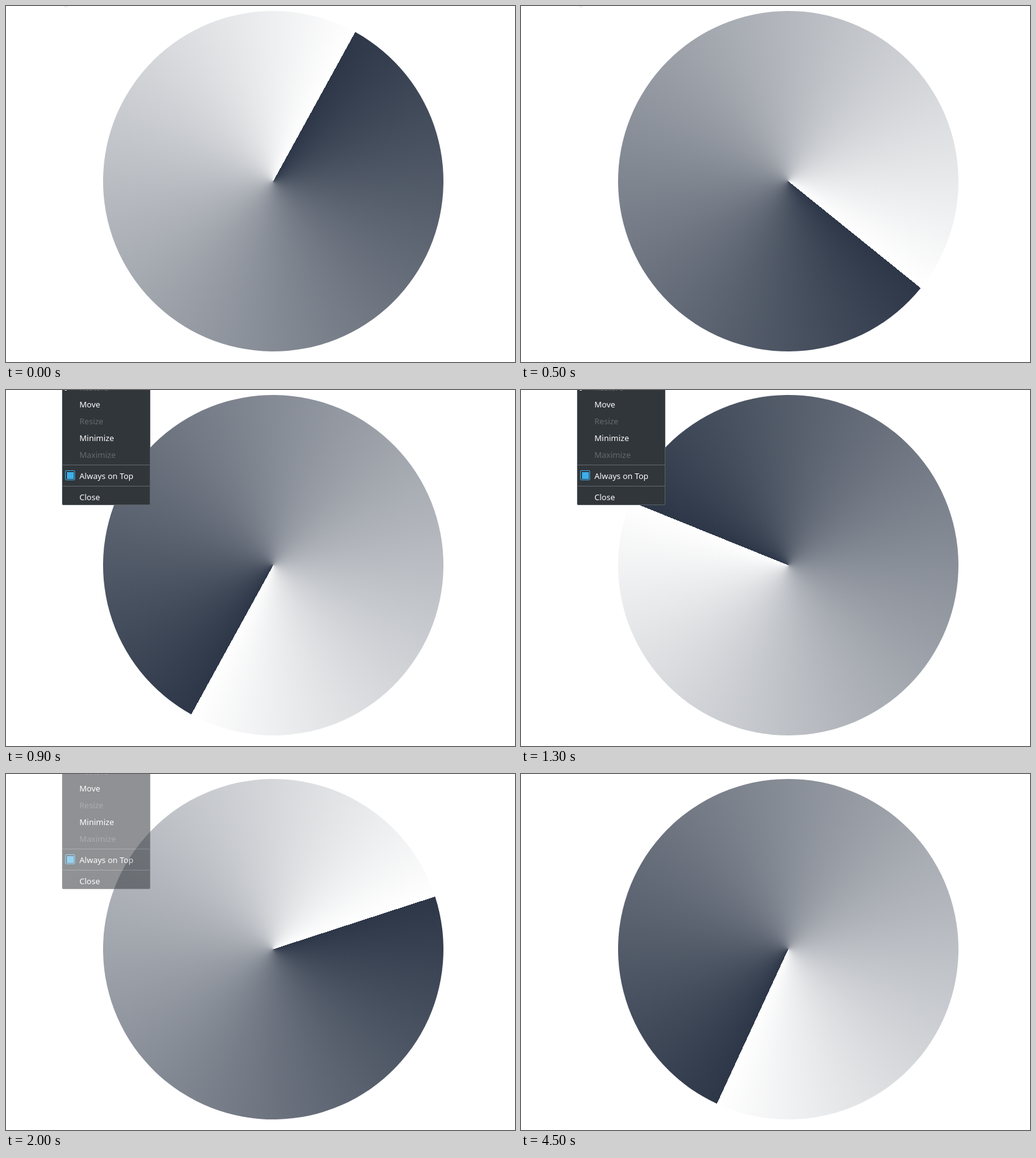
An HTML page that plays this animation: 818 by 572 pixels, repeating every 4600 ms.

```html
<!DOCTYPE html>
<html lang="en">
<head>
<meta charset="utf-8">
<title>Rotating conic gradient</title>
<style>
html, body { margin: 0; width: 100%; height: 100%; overflow: hidden; background: #fff; }
body, #menu { position: relative; }
div { position: absolute; box-sizing: border-box; }
#disc {
  left: 156px; top: 8px; width: 547px; height: 547px;
  border-radius: 50%;
  background: conic-gradient(#2d3748, #fff);
}
#menu {
  position: absolute;
  left: 90px; top: -30px; width: 142px; height: 215px;
  background: #31363b; border: 1px solid #5b6064; border-radius: 2px;
  font: 13px/26px "Noto Sans", sans-serif;
  color: #fcfcfc; white-space: nowrap;
}
.item { left: 27px; }
.off { color: #656a6e; }
.rule { left: 0; width: 140px; height: 1px; background: #63676b; }
#box {
  left: 4px; top: 158px; width: 16px; height: 16px;
  border: 1px solid #3daee9; border-radius: 2px;
  background: #3daee9 content-box; padding: 1.5px;
}
#pointer {
  left: 95px; top: -2px; width: 3px; height: 3px;
  background: #fff; transform: skewX(-25deg);
  box-shadow: 0 0 2px rgba(0, 0, 0, .45);
}
</style>
</head>
<body>
<div id="disc"></div>
<div id="menu"><div id="box"></div></div>
<div id="pointer"></div>
<script>
const LOOP = 4600, STEP = 100;
const [disc, menu, pointer] = ["disc", "menu", "pointer"].map(id => document.getElementById(id));

// [step, value] pairs, interpolated linearly
const ANGLE = [[0, 28.8], [5, 128.9], [9, 208.8], [13, 292], [20, 432], [24, 508.6], [45, 564.8]];
const FADE = [[0, 0], [7, 0], [8, 1], [19, 1], [20, .54], [21, .1], [22, 0], [45, 0]];

function addPart(className, top, text = "") {
  const part = document.createElement("div");
  part.className = className;
  part.style.top = top + 29 + "px";
  part.textContent = text;
  menu.append(part);
}

addPart("item off", -17, "Restore");
addPart("item", 10, "Move");
addPart("item off", 37, "Resize");
addPart("item", 64, "Minimize");
addPart("item off", 91, "Maximize");
addPart("rule", 120);
addPart("item", 125, "Always on Top");
addPart("rule", 154);
addPart("item", 159, "Close");

function valueAt(keys, step) {
  const next = Math.max(1, keys.findIndex(([s]) => s >= step));
  const [s0, v0] = keys[next - 1], [s1, v1] = keys[next];
  return v0 + (v1 - v0) * (step - s0) / (s1 - s0);
}

function draw(now) {
  let step = Math.floor(now % LOOP / STEP);
  // the turn pauses before its last step
  if (step > 24 && step < 45) step = 24;
  disc.style.transform = `rotate(${valueAt(ANGLE, step)}deg)`;
  menu.style.opacity = valueAt(FADE, step);
  pointer.style.visibility = step < 16 ? "visible" : "hidden";
}

const start = performance.now();
function tick() {
  draw(performance.now() - start);
  requestAnimationFrame(tick);
}
tick();
</script>
</body>
</html>
```
